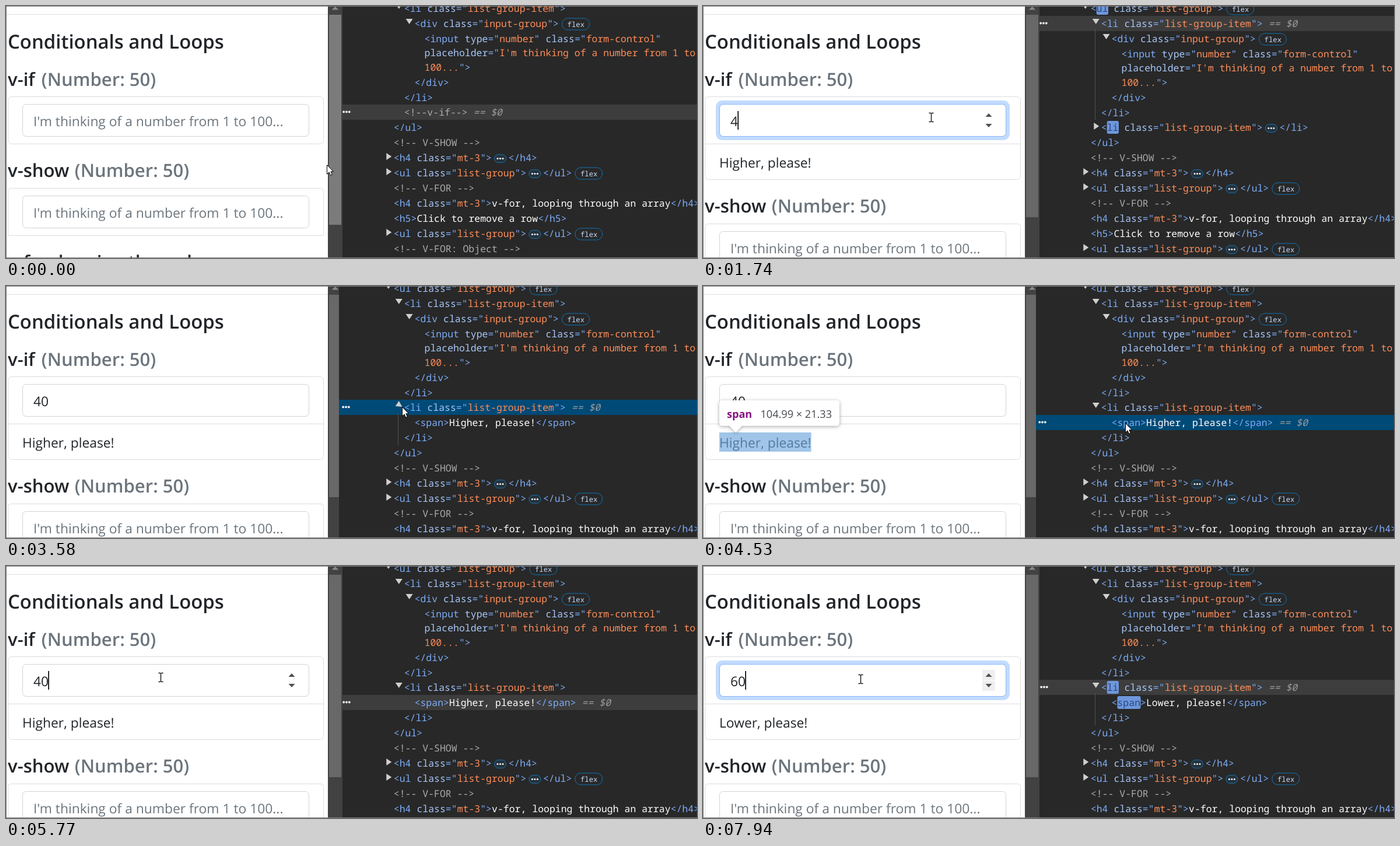
An HTML page that plays this animation: 1185 by 432 pixels, repeating every 8 s.

```html
<!DOCTYPE html>
<html lang="en">
<head>
<meta charset="utf-8">
<title>Conditionals and Loops</title>
<style>
  html, body { margin: 0; width: 100%; height: 100%; overflow: hidden; background: #fff; }
  svg { display: block; width: 100%; height: 100%; }
  text { white-space: pre; text-rendering: geometricPrecision; font-family: "Open Sans", "Noto Sans", sans-serif; }
  .body { font-size: 22.8px; fill: #212529; }
  .h3 { font-size: 32.9px; font-weight: 600; fill: #212529; }
  .h4 { font-size: 31.1px; font-weight: 600; fill: #212529; }
  .muted { fill: #6c757d; }
  .tip { font-size: 18.1px; fill: #46494d; }
  .tip .tag { font-weight: 700; fill: #881280; }
  .tip .cls { font-weight: 700; fill: #1a1aa6; }
  .code { font-family: "Noto Sans Mono", "DejaVu Sans Mono", monospace; font-size: 16.49px; }
  .badge { font-family: "Noto Sans Mono", "DejaVu Sans Mono", monospace; font-size: 12.3px; fill: #c6dcfa; }
  .t { fill: #7cacf8; }
  .a { fill: #a8c7fa; }
  .v { fill: #fe8d59; }
  .c { fill: #ababab; }
  .w { fill: #fff; }
  .s { fill: #9b9b9b; font-style: italic; }
  .m { fill: #28487f; }
</style>
</head>
<body>
<svg id="stage" viewBox="0 0 1185 432" preserveAspectRatio="none">
  <defs>
    <filter id="shadow" x="-20%" y="-40%" width="140%" height="190%">
      <feDropShadow dx="0" dy="1.5" stdDeviation="3.2" flood-color="#000" flood-opacity=".35"/>
    </filter>
  </defs>
</svg>
<script>
const LOOP = 8000;
const CHAR = 9.896;
const INDENT = [664.8, 682.8, 700.6, 717.6];
const stage = document.getElementById('stage');
const timed = [];

function add(parent, name, attrs, text) {
  const el = document.createElementNS('http://www.w3.org/2000/svg', name);
  for (const key in attrs) el.setAttribute(key, attrs[key]);
  if (text !== undefined) el.textContent = text;
  parent.appendChild(el);
  return el;
}
const group = (parent = stage) => add(parent, 'g', {});
const rect = (p, x, y, width, height, fill, more) =>
  add(p, 'rect', { x, y, width, height, fill, ...more });
const label = (p, x, y, cls, text) => add(p, 'text', { x, y, class: cls }, text);
const poly = (p, points, fill, more) => add(p, 'polygon', { points, fill, ...more });
const path = (p, d, more) => add(p, 'path', { d, fill: 'none', ...more });

// Visible only inside the given [from, to] spans
function during(el, ...spans) {
  timed.push({ el, spans });
  return el;
}

// ---------- page ----------
const page = group();
rect(page, 0, 0, 552, 432, '#fff');
rect(page, 1, 14, 551, 1, '#dcdfe2');
label(page, 3, 73, 'h3', 'Conditionals and Loops');

function heading(p, name, x, y) {
  label(p, 3, y, 'h4', name);
  label(p, x, y, 'h4 muted', '(Number: 50)');
}
const outline = (p, x, y, w, h, stroke, rx = 6) =>
  rect(p, x + .5, y + .5, w - 1, h - 1, 'none', { rx, stroke });
const field = (p, y) => rect(p, 28.5, y + .5, 491, 55, '#fff', { rx: 6, stroke: '#ced4da' });
const HINT = "I'm thinking of a number from 1 to 100...";

heading(page, 'v-if', 60.8, 137);

during(outline(page, 3, 155, 542, 82, '#dcdcdc'), [0, 1590]);
const answer = during(group(page), [1590, LOOP]);
outline(answer, 3, 155, 542, 143, '#dcdcdc');
rect(answer, 3, 236, 542, 1, '#dcdcdc');
during(label(answer, 28, 277, 'body', 'Higher, please!'), [1590, 7940]);
during(label(answer, 28, 277, 'body', 'Lower, please!'), [7940, LOOP]);

const ring = rect(page, 22, 162, 504, 68, '#c2dbfe', { rx: 11 });
field(page, 168);
const ringEdge = outline(page, 28, 168, 492, 56, '#86b7fe');

const spin = during(group(page), [130, 3580], [5480, LOOP]);
const spinBack = during(group(spin), [1860, 3580], [5920, LOOP]);
rect(spinBack, 479, 178, 22, 17.5, '#efefef');
rect(spinBack, 479, 196.5, 22, 17.5, '#efefef');
poly(spin, '484.5,190 490,184 495.5,190', '#505050');
poly(spin, '484.5,202 495.5,202 490,208', '#505050');

during(label(page, 47, 206, 'body muted', HINT), [0, 1590]);
during(rect(page, 47, 179, 26, 35, '#0078d7'), [6460, 7790]);
during(label(page, 47, 206, 'body', '4'), [1590, 1860]);
during(label(page, 47, 206, 'body', '40'), [1860, 6460]);
const picked = during(label(page, 47, 206, 'body', '40'), [6460, 7790]);
picked.style.fill = '#fff';
during(label(page, 47, 206, 'body', '6'), [7790, 7940]);
during(label(page, 47, 206, 'body', '60'), [7940, LOOP]);

const caret = (x, ...spans) => during(rect(page, x, 180, 1.8, 32, '#111'), ...spans);
caret(47.2, [660, 1190]);
caret(59.3, [1590, 1860], [7790, 7940]);
caret(72.2, [1860, 2410], [2940, 3430], [5770, 6330], [7940, LOOP]);

function lower(dy, ...spans) {
  const g = during(group(page), ...spans);
  heading(g, 'v-show', 117.8, 293 + dy);
  path(g, `M3.5 ${393.5 + dy}V${318.5 + dy}q0-6 6-6H538.5q6 0 6 6V${393.5 + dy}Z`, { stroke: '#dcdcdc' });
  field(g, 325 + dy);
  label(g, 47, 363 + dy, 'body muted', HINT);
  label(g, 3, 450 + dy, 'h4', 'v-for, looping through an array');
}
lower(0, [0, 1590]);
lower(61, [1590, LOOP]);

// ---------- inspect overlays ----------
const BLUE = 'rgba(111,168,220,.66)';

function tip(p, x, y, width) {
  const g = add(p, 'g', { filter: 'url(#shadow)' });
  const ax = x + 28;
  rect(g, x, y, width, 43.5, '#fff', { rx: 5 });
  poly(g, `${ax - 11},${y + 43} ${ax + 11},${y + 43} ${ax},${y + 55}`, '#fff');
}
function name(p, x, y, tag, cls) {
  const t = label(p, x, y, 'tip', '');
  add(t, 'tspan', { class: 'tag' }, tag);
  add(t, 'tspan', { class: 'cls' }, cls);
}

const divBox = during(group(), [2920, 3180]);
rect(divBox, 28, 168, 493, 57, BLUE);
rect(divBox, 27.7, 168.7, 493.6, 56, 'none', { stroke: '#8127d6', 'stroke-width': 1.6, 'stroke-dasharray': '5.5 2.6' });
tip(divBox, 28, 113, 321);
for (const [x, y, w] of [[41.5, 127.5, 11], [56, 127.5, 9], [41.5, 137, 8], [53, 137, 12]])
  rect(divBox, x, y, w, 6, 'none', { stroke: '#1a73e8', 'stroke-width': 1.4 });
name(divBox, 80, 143, 'div', '.input-group');
label(divBox, 238.5, 143, 'tip', '328 × 37.33');

const itemBox = during(group(), [3180, 3580], [5090, 5350]);
path(itemBox, 'M3 237H545V298H3ZM28 249V286H520V249Z', { style: 'fill:rgba(147,196,125,.55);fill-rule:evenodd' });
rect(itemBox, 28, 249, 492, 37, BLUE);
tip(itemBox, 3, 181, 322);
name(itemBox, 16, 211, 'li', '.list-group-item');
label(itemBox, 189, 211, 'tip', '361.33 × 41.33');

const spanBox = during(group(), [3850, 5090]);
rect(spanBox, 28, 251, 157.5, 33, BLUE);
tip(spanBox, 28, 196, 206);
name(spanBox, 41, 226, 'span', '');
label(spanBox, 98.5, 226, 'tip', '104.99 × 21.33');

// ---------- scrollbar ----------
const bar = group();
rect(bar, 552, 0, 25, 432, '#424242');
poly(bar, '558.5,6.5 564.5,1 570.5,6.5', '#8a8a8a');
during(rect(bar, 554, 15, 21, 360, '#7b7b7b'), [0, 130]);
during(rect(bar, 554, 15, 21, 360, '#686868'), [130, 1590]);
during(rect(bar, 554, 15, 21, 347, '#686868'), [1590, LOOP]);

// ---------- element tree ----------
// The focused panel reaches a little over the scrollbar
const EDGE = 577, WIDE = 571;
const tools = group();
rect(tools, EDGE, 0, 608, 432, '#282828');
during(rect(tools, WIDE, 0, 614, 432, '#282828'), [3580, 5770]);

function stripe(y, fill, x, ...spans) {
  during(rect(tools, x, y - 13, 1185 - x, 26, fill), ...spans);
}
function more(y, x, ...spans) {
  const g = during(group(tools), ...spans);
  for (const i of [-1, 0, 1]) add(g, 'circle', { cx: x + i * 4.8, cy: y - .5, r: 1.9, fill: '#f4f4f4' });
}
const GREY = '#3d3d3d', HOVER = '#393939', NAVY = '#004a77';
stripe(182, GREY, EDGE, [0, 1740]);
stripe(30, GREY, EDGE, [1740, 3580]);
stripe(157, HOVER, EDGE, [2920, 3180]);
stripe(208, HOVER, EDGE, [3180, 3580]);
stripe(208, NAVY, WIDE, [3580, 4530]);
stripe(234, HOVER, WIDE, [3850, 4530]);
stripe(234, NAVY, WIDE, [4530, 5770]);
stripe(260, HOVER, WIDE, [5090, 5350]);
stripe(234, GREY, EDGE, [5770, 7940]);
stripe(208, GREY, EDGE, [7940, LOOP]);
more(182, 584, [0, 1740]);
more(30, 584, [1740, 3580]);
more(208, 583, [3580, 4530]);
more(234, 582, [4530, 5770]);
more(234, 584, [5770, 7940]);
more(208, 585, [7940, LOOP]);

const guide = (y, h, ...spans) => during(rect(tools, 672, y, 1, h, '#505050'), ...spans);
guide(39, 156, [1740, 3580]);
guide(218, 55, [3580, 4530], [7940, LOOP]);

const open = (tag, cls) =>
  [['t', '<' + tag + ' '], ['a', 'class'], ['t', '="'], ['v', cls], ['t', '">']];
const close = tag => ['t', `</${tag}>`];
const note = text => [['c', `<!-- ${text} -->`]];
const SELF = ['s', ' == $0'];

function arrow(p, kind, x, y) {
  const pts = {
    down: [[-15, -8], [-3, -8], [-9, 1]],
    right: [[-12.5, -8], [-3.5, -2], [-12.5, 4]],
    turn: [[-9, -11], [-3.5, -1], [-15, -2]]
  }[kind];
  return poly(p, pts.map(([a, b]) => `${x + a},${y + b}`).join(' '), '#cfcfcf');
}

function row(p, y, depth, parts, mark) {
  let x = INDENT[depth];
  if (mark) arrow(p, mark, x, y);
  for (const [kind, text] of parts) {
    if (kind === 'dots') {
      rect(p, x + 4.5, y - 5.5, 20, 14, '#26323b', { rx: 7, stroke: '#1074b5' });
      for (const i of [-1, 0, 1]) add(p, 'circle', { cx: x + 14.5 + i * 4.5, cy: y + 1.5, r: 1.6, fill: '#e6eefb' });
      x += 28.5;
    } else if (kind === 'flex') {
      rect(p, x + 5.5, y - 9, 47, 20, 'none', { rx: 10, stroke: '#1074b5' });
      label(p, x + 14.5, y + 5.5, 'badge', 'flex');
    } else {
      label(p, x, y + 6, 'code ' + kind, text);
      x += text.length * CHAR;
    }
  }
}

const ITEM = open('li', 'list-group-item');
const LIST = open('ul', 'list-group');

// Input group block, first row at y
function inputRows(p, y) {
  row(p, y, 2, [...open('div', 'input-group'), ['flex']], 'down');
  row(p, y + 26, 3, [['t', '<input '], ['a', 'type'], ['t', '="'], ['v', 'number'], ['t', '" '],
    ['a', 'class'], ['t', '="'], ['v', 'form-control'], ['t', '"']]);
  row(p, y + 50, 3, [['a', 'placeholder'], ['t', '="'], ['v', "I'm thinking of a number from 1 to"]]);
  row(p, y + 75, 3, [['v', '100...'], ['t', '">']]);
  row(p, y + 101, 2, [close('div')]);
  row(p, y + 126.5, 1, [close('li')]);
}

// Everything from the closing list tag down
function restRows(p, y) {
  const folded = [...LIST, ['dots'], close('ul'), ['flex']];
  const rows = [
    [[close('ul')]],
    [note('V-SHOW')],
    [[...open('h4', 'mt-3'), ['dots'], close('h4')], 'right'],
    [folded, 'right'],
    [note('V-FOR')],
    [[...open('h4', 'mt-3'), ['w', 'v-for, looping through an array'], close('h4')]],
    [[['t', '<h5>'], ['w', 'Click to remove a row'], close('h5')]],
    [folded, 'right'],
    [note('V-FOR: Object')]
  ];
  rows.forEach(([parts, mark], i) => {
    if (y + i * 26 < 440) row(p, y + i * 26, 0, parts, mark);
  });
}

const before = during(group(tools), [0, 1740]);
row(before, 4, 1, ITEM, 'down');
inputRows(before, 30);
row(before, 182, 1, [['c', '<!--v-if-->'], SELF]);
restRows(before, 208);

const after = during(group(tools), [1740, LOOP]);
row(after, 4, 0, [...LIST, ['flex']], 'down');
row(after, 30, 1, ITEM, 'down');
inputRows(after, 56);
during(label(after, INDENT[1] + 28 * CHAR, 36, 'code s', SELF[1]), [1740, 3580]);

const folded = during(group(tools), [1740, 3580]);
row(folded, 208, 1, [...ITEM, ['dots'], close('li')], 'right');
restRows(folded, 234);

const unfolded = during(group(tools), [3580, LOOP]);
row(unfolded, 208, 1, ITEM);
during(arrow(unfolded, 'turn', INDENT[1], 208), [3580, 3700]);
during(arrow(unfolded, 'down', INDENT[1], 208), [3700, LOOP]);
during(label(unfolded, INDENT[1] + 28 * CHAR, 214, 'code s', SELF[1]), [3580, 4530], [7940, LOOP]);
row(unfolded, 260, 1, [close('li')]);
restRows(unfolded, 286);

function spanRow(text, ...spans) {
  const g = during(group(unfolded), ...spans);
  row(g, 234, 2, [['t', '<span>'], ['w', text], close('span')]);
}
spanRow('Higher, please!', [3580, 7940]);
spanRow('Lower, please!', [7940, LOOP]);
during(label(unfolded, INDENT[2] + 28 * CHAR, 240, 'code s', SELF[1]), [4530, 7940]);

// Flash on changed tag names
function flash(p, depth, y, tag) {
  const x = INDENT[depth] + CHAR;
  rect(p, x, y - 11, tag.length * CHAR + .5, 22, '#6e97dc', { rx: 3 });
  label(p, x, y + 6, 'code m', tag);
}
const flashA = during(group(tools), [1740, 2410]);
flash(flashA, 0, 4, 'ul');
flash(flashA, 1, 208, 'li');
const flashB = during(group(tools), [7940, LOOP]);
flash(flashB, 1, 208, 'li');
flash(flashB, 2, 234, 'span');

// ---------- frame and pointer ----------
for (const [x, y, w, h] of [[0, 0, 1185, 1], [0, 431, 1185, 1], [0, 0, 1, 432]])
  rect(stage, x, y, w, h, '#7f7f7f');

const pointer = group();
const hand = path(pointer, 'M.5.5V16.2L4.1 12.8 6.6 18.4 9.3 17.2 6.9 11.8H11.6Z',
  { style: 'fill:#fff', stroke: '#000', 'stroke-width': 1 });
const beam = path(pointer, 'M-4-7.5H-1.5L0-6.7 1.5-7.5H4M0-6.7V7M-4 7.5H-1.5L0 6.7 1.5 7.5H4',
  { stroke: '#111', 'stroke-width': 1.4 });

// time, x, y, text beam?
const MOVES = [
  [0, 550, 272, 0], [130, 506, 208, 1], [280, 470, 201, 1], [400, 430, 195, 1], [530, 400, 190, 1],
  [660, 391, 189, 1], [1050, 391, 191, 1], [2660, 450, 199, 1], [2790, 600, 205, 0], [2920, 680, 158, 0],
  [3050, 691, 170, 0], [3180, 687, 198, 0], [3300, 681, 205, 0], [3430, 679, 207, 0], [3850, 692, 222, 0],
  [3980, 712, 230, 0], [4100, 724, 235, 0], [4950, 715, 241, 0], [5090, 690, 254, 0], [5220, 625, 256, 0],
  [5350, 540, 244, 0], [5480, 410, 212, 1], [5610, 295, 196, 1], [5770, 265, 191, 1], [6610, 267, 191, 1],
  [6740, 269, 191, 1], [6870, 270, 191, 1], [7530, 270, 192, 1], [7940, 270, 194, 1]
];
const RING = [[0, 0], [660, .5], [790, 1], [3580, 0], [5920, 1]];
const FADE = [[0, 1], [1860, .85], [2000, .6], [2150, .35], [2270, .15]];

const at = (steps, t) => steps.filter(s => s[0] <= t).pop();

function draw(t) {
  for (const { el, spans } of timed)
    el.style.display = spans.some(([a, b]) => t >= a && t < b) ? '' : 'none';
  const glow = at(RING, t)[1];
  ring.style.opacity = ringEdge.style.opacity = glow;
  flashA.style.opacity = at(FADE, t)[1];
  const [, x, y, text] = at(MOVES, t);
  pointer.setAttribute('transform', `translate(${x + (text ? .5 : 0)} ${y})`);
  hand.style.display = text ? 'none' : '';
  beam.style.display = text ? '' : 'none';
}

const start = performance.now();
function tick() {
  draw((performance.now() - start) % LOOP);
  requestAnimationFrame(tick);
}
tick();
</script>
</body>
</html>
```
